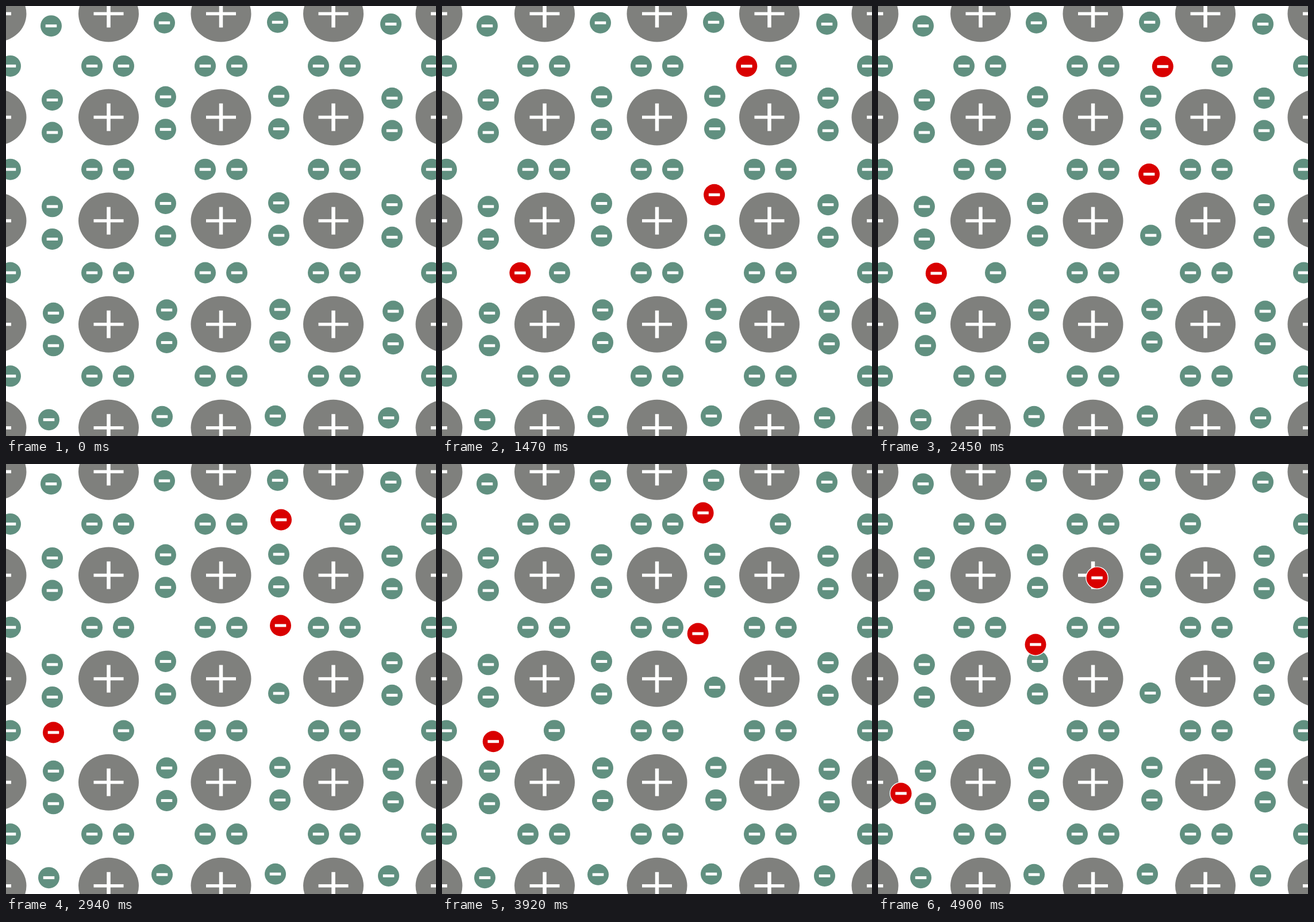
Animation of 748 by 748 pixels, one loop 5390 ms. Source, as an HTML page with a canvas:

```html
<!DOCTYPE html>
<html lang="en">
<head>
<meta charset="utf-8">
<title>Free electrons in a lattice</title>
<style>
html, body { margin: 0; width: 100%; height: 100%; overflow: hidden; background: #fff; }
canvas { display: block; width: 748px; height: 748px; }
</style>
</head>
<body>
<canvas id="stage" width="748" height="748"></canvas>
<script>
const ctx = document.getElementById('stage').getContext('2d');
const STEP = 490, STEPS = 11, EXCITED = 2, REST = 7;
const GREEN = '#619080', RED = '#d90000', GRAY = '#7f807d';

// Key steps: freed electrons drift, rest, then fly off while the mates follow
const FREE_STEPS = [EXCITED, 5, 6, REST, 9, 10];
const MATE_STEPS = [REST, 9, 10];

const trios = [
  {
    home: [543.5, 104.4], drift: [495.3, 105.3], rest: [478.5, 97], flight: [[397, 57], [381, 198]],
    mate: [[598.5, 104.4], [566, 104], [543.5, 104]]
  },
  {
    home: [474.5, 342.5], drift: [471.5, 292.5], rest: [477.5, 281], flight: [[369.5, 328], [274, 314]],
    mate: [[474.5, 399], [474.5, 363.5], [473.5, 398.5]]
  },
  {
    home: [149.5, 464], drift: [101.3, 465], rest: [82.5, 467], flight: [[105, 519.5], [40, 573]],
    mate: [[204.5, 464], [174, 463], [149, 463.5]]
  }
];
const freed = trios.map(t => [t.home, t.drift, t.rest, t.rest, ...t.flight]);
const mates = trios.map(t => t.mate);

// Point on a path at a step, speeding up within each leg
function along(path, steps, step) {
  const i = steps.findIndex(s => s >= step);
  if (i < 1) return path[0];
  const leg = (step - steps[i - 1]) / (steps[i] - steps[i - 1]);
  const k = leg ** (step > REST ? 1.74 : 1.15);
  return path[i].map((end, axis) => path[i - 1][axis] * (1 - k) + end * k);
}

function disc(x, y, rx, ry, color) {
  ctx.fillStyle = color;
  ctx.beginPath();
  ctx.ellipse(x, y, rx, ry, 0, 0, Math.PI * 2);
  ctx.fill();
}

function bar(x, y, w, h) {
  ctx.fillStyle = '#fff';
  ctx.fillRect(x - w / 2, y - h / 2, w, h);
}

function ion(x, y) {
  disc(x, y, 52.5, 49, GRAY);
  bar(x, y, 52, 5.5);
  bar(x, y, 6.5, 48);
}

function electron([x, y], color = GREEN) {
  if (color === RED) disc(x, y, 19.8, 19.8, '#fff');
  disc(x, y, 18.5, 18.5, color);
  bar(x, y, 19.5, 5);
}

// Bound electrons: side-by-side pairs in rows, stacked pairs in columns
const bound = [];
const rowShift = [-2, 0, 0, 2, -6], columnShift = [0, -5.4, -6.4, -3.2];
for (let c = 0; c < 4; c++) {
  for (let r = 0; r < 4; r++)
    for (const x of [7.5, 149.5]) bound.push([x + 197 * c, 104.4 + 179.8 * r]);
  for (let r = 0; r < 5; r++)
    for (const dy of [-28.3, 28.3])
      bound.push([80.5 + rowShift[r] + 197 * c, 6.35 + 185.4 * r + columnShift[c] + dy]);
}
const homes = [...freed, ...mates].map(path => path[0]);
const still = bound.filter(([x, y]) =>
  y > 0 && y < 748 && !homes.some(([hx, hy]) => Math.hypot(x - hx, y - hy) < 2));

function draw(step) {
  ctx.fillStyle = '#fff';
  ctx.fillRect(0, 0, 748, 748);
  for (let r = 0; r < 5; r++)
    for (let c = 0; c < 5; c++) ion(-17 + 195.5 * c, 13.4 + 180.1 * r);
  still.forEach(p => electron(p));
  mates.forEach(path => electron(along(path, MATE_STEPS, step)));
  freed.forEach(path => electron(along(path, FREE_STEPS, step), step < EXCITED ? GREEN : RED));
}

const start = performance.now();
function tick() {
  draw(Math.floor((performance.now() - start) / STEP) % STEPS);
  requestAnimationFrame(tick);
}
tick();
</script>
</body>
</html>
```
